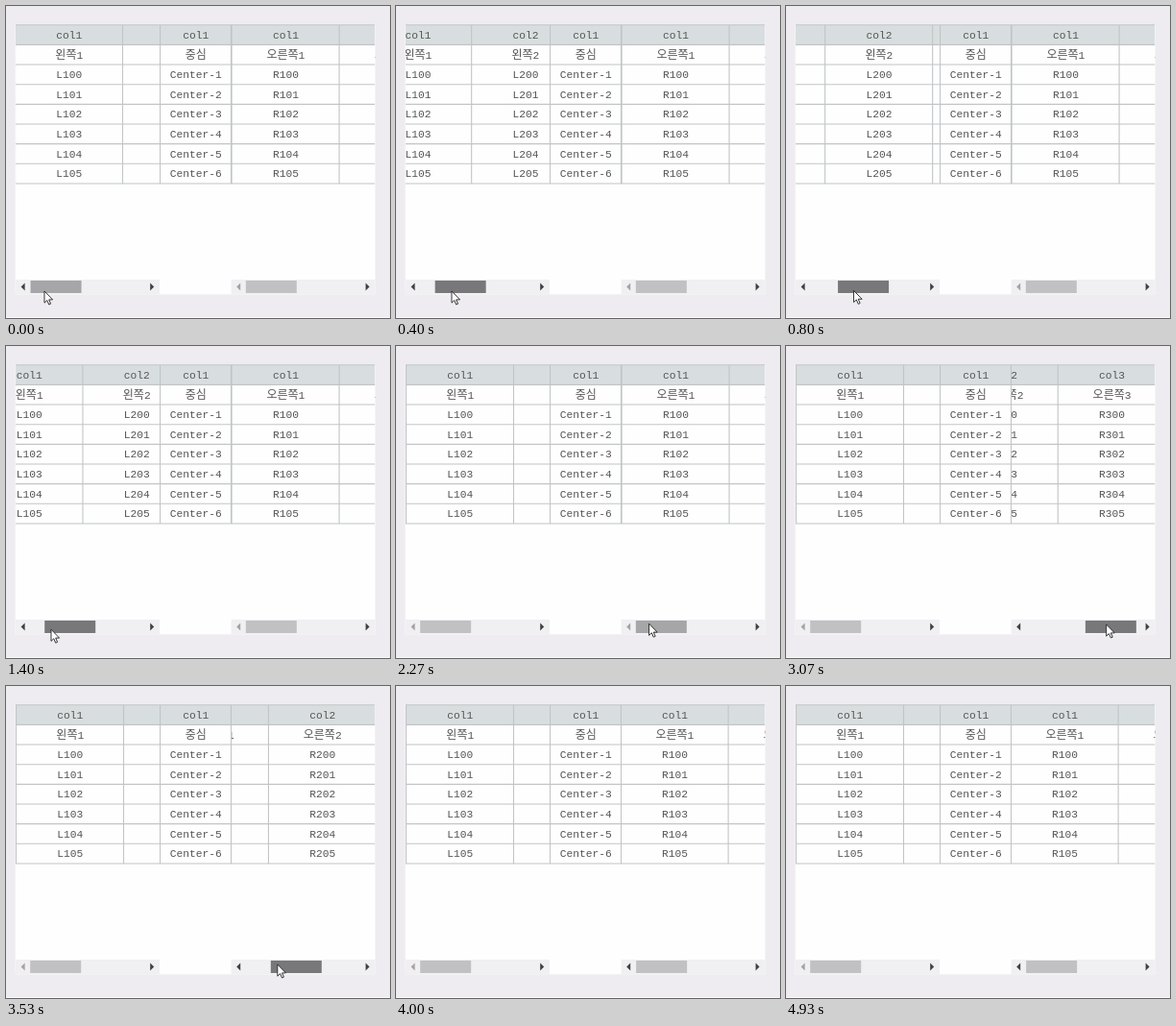
An HTML page that plays this animation: 400x325 px, repeating every 5000 ms.

```html
<!DOCTYPE html>
<html lang="ko">
<head>
<meta charset="utf-8">
<title>Split grid scrolling</title>
<style>
  html, body { margin: 0; width: 100%; height: 100%; overflow: hidden; background: #eeecf0; }
  #stage { display: block; width: 400px; height: 325px; }
  text { font: 11.25px "Liberation Mono", "Courier New", monospace; fill: #555; text-anchor: middle; }
  .ko { font: 12px "Noto Sans CJK KR", "Noto Sans CJK", sans-serif; }
  .rule { stroke: #c2c4c6; stroke-width: 1.1; }
  .thumb { fill: #c1c0c2; }
  .thumb.hover { fill: #a6a5a7; }
  .thumb.press { fill: #787779; }
  .arrow { fill: #404042; }
  .arrow.off { fill: #a3a2a5; }
</style>
</head>
<body>
<svg id="stage" viewBox="0 0 400 325">
  <rect width="400" height="325" fill="#eeecf0"/>
  <rect y="324" width="400" height="1" fill="#fafafa"/>
  <rect x="9.7" y="19.3" width="374.8" height="281" fill="#fefefe"/>
</svg>
<script>
const LOOP = 5000, FRAME = 1000 / 15, LAG = 64;
const TOP = 19.7, ROW = 20.66, ROWS = 8, COL = 112;
const MAX_SCROLL = 187, TRAVEL = 66, THUMB = 53;
const stage = document.getElementById('stage');
const clamp = (v, lo, hi) => Math.min(hi, Math.max(lo, v));

function add(parent, tag, attrs = {}) {
  const node = document.createElementNS('http://www.w3.org/2000/svg', tag);
  for (const key in attrs) node.setAttribute(key, attrs[key]);
  parent.append(node);
  return node;
}

const line = (parent, x1, y1, x2, y2) => add(parent, 'line', { x1, y1, x2, y2, class: 'rule' });

function label(parent, x, row, word, suffix = '') {
  const text = add(parent, 'text', { x, y: TOP + ROW * row + 14 });
  const korean = /[가-힣]/.test(word);
  add(text, 'tspan', korean ? { class: 'ko', dy: 0.8 } : {}).textContent = word;
  add(text, 'tspan').textContent = suffix;
}

// A clipped grid; the returned group holds the part that scrolls.
function grid(x, width, columns, colWidth, cell) {
  const view = add(stage, 'svg', { x, y: 0, width, height: 200 });
  add(view, 'rect', { y: TOP, width, height: ROW, fill: '#d8dedf' });
  for (let r = 0; r <= ROWS; r++) line(view, 0, TOP + ROW * r, width, TOP + ROW * r);
  const body = add(view, 'g');
  for (let c = 0; c <= columns; c++) {
    const edge = c * colWidth + 0.5;
    line(body, edge, TOP, edge, TOP + ROW * ROWS);
    if (c === columns) break;
    for (let r = 0; r < ROWS; r++) label(body, edge + colWidth / 2 + 0.3, r, ...cell(r, c + 1));
  }
  return body;
}

const sideCell = (letter, title) => (r, c) =>
  r === 0 ? ['col', c] : r === 1 ? [title, c] : [letter, `${c}0${r - 2}`];
const centerCell = r => r === 0 ? ['col1'] : r === 1 ? ['중심'] : ['Center-', r - 1];

function scrollPane(x, width, letter, title, drag) {
  const body = grid(x, width, 3, COL, sideCell(letter, title));
  add(stage, 'rect', { x, y: 285, width, height: 15.3, fill: '#f0eff2' });
  const arrow = (tip, base) => add(stage, 'path', { d: `M${tip} 292.5L${base} 288.6V296.4Z` });
  const back = arrow(x + 5.6, x + 9.6);
  const next = arrow(x + width - 5.8, x + width - 9.8);
  const thumb = add(stage, 'rect', { x: x + 15.2, y: 286, width: THUMB, height: 13 });

  return t => {
    const [pointerX] = pointerAt(clamp(t - LAG, drag.start, drag.end));
    const offset = clamp(pointerX - drag.grab, 0, TRAVEL);
    const state = t >= drag.start + FRAME && t <= drag.end ? 'press'
      : t >= drag.enter && t <= drag.leave ? 'hover' : '';
    body.setAttribute('transform', `translate(${-offset / TRAVEL * MAX_SCROLL})`);
    thumb.setAttribute('transform', `translate(${offset})`);
    thumb.setAttribute('class', `thumb ${state}`);
    back.setAttribute('class', offset > 0.2 ? 'arrow' : 'arrow off');
    next.setAttribute('class', offset < TRAVEL ? 'arrow' : 'arrow off');
  };
}

// Turning points of the pointer: time, x, y.
const stops = [
  [0, 40, 297], [400, 58, 297], [1070, 79, 296], [1133, 79, 296], [1475, 38, 295],
  [1700, 38, 298], [1960, 130, 307], [2270, 265, 289], [2400, 265, 289],
  [3070, 334, 290], [3133, 334, 290], [3670, 265.35, 290], [LOOP, 265.35, 290]
];

function pointerAt(t) {
  const i = stops.findIndex(stop => stop[0] > t);
  const [t0, x0, y0] = stops[i - 1], [t1, x1, y1] = stops[i];
  const k = (t - t0) / (t1 - t0);
  return [x0 + (x1 - x0) * k, y0 + (y1 - y0) * k];
}

const leftDrag = { enter: 0, start: 0, end: 1660, leave: 1760, grab: 39.65 };
const rightDrag = { enter: 2190, start: 2400, end: 3860, leave: 3960, grab: 265 };
const panes = [
  scrollPane(10, 150, 'L', '왼쪽', leftDrag),
  scrollPane(234.6, 149.8, 'R', '오른쪽', rightDrag)
];
grid(160, 75, 1, 74, centerCell);
const cursor = add(stage, 'path', {
  d: 'M0 0V12.2L2.8 9.6L4.7 14L6.6 13.2L4.7 8.9H8.6Z',
  fill: '#fff', stroke: '#222', 'stroke-width': 0.9
});

function draw(now) {
  const t = Math.floor((now % LOOP) / FRAME + 0.1) * FRAME % LOOP;
  for (const drawPane of panes) drawPane(t);
  cursor.setAttribute('transform', `translate(${pointerAt(t)})`);
  cursor.setAttribute('visibility', t <= rightDrag.leave ? 'visible' : 'hidden');
}

const start = performance.now();
function tick() {
  draw(performance.now() - start);
  requestAnimationFrame(tick);
}
tick();
</script>
</body>
</html>
```
